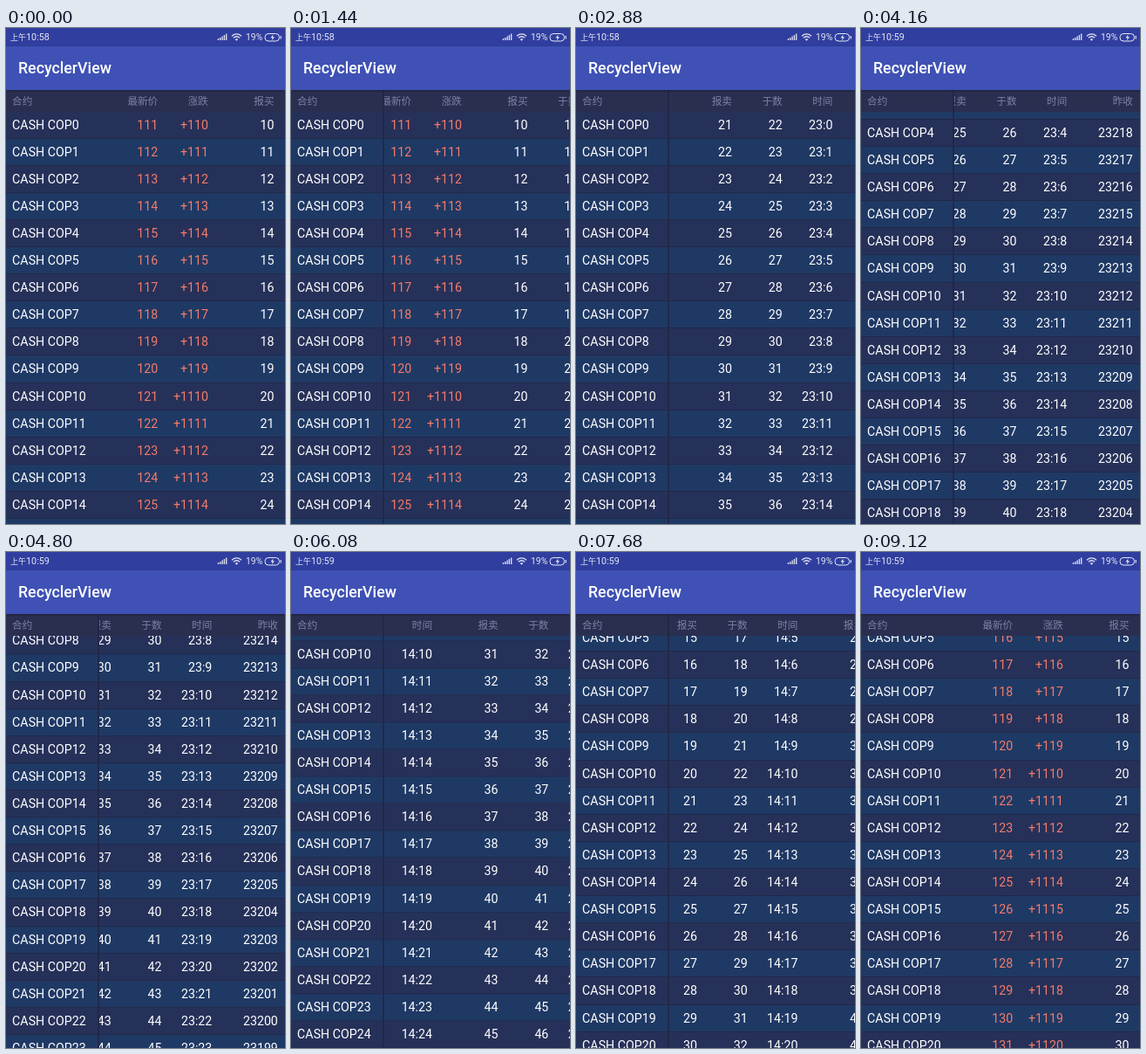
Write an HTML page that moves like this. It is 320x568 px and loops after 9280 ms.

```html
<!DOCTYPE html>
<html lang="zh-CN">
<head>
<meta charset="utf-8">
<title>RecyclerView</title>
<style>
  :root { --dp: .88889px; --x: 0px; --y: 0px; --fixed: calc(120 * var(--dp)); --line: #222848; }
  html, body { margin: 0; width: 100%; height: 100%; overflow: hidden; background: #263159; }
  body { font-family: Roboto, "Noto Sans CJK SC", "Noto Sans CJK", sans-serif; color: #fff; }
  #stage { position: relative; width: 320px; height: 568px; overflow: hidden; background: #263159; }
  #status { position: absolute; inset: 0 0 auto; height: 21px; background: #303f9f; color: #e4e6f3; }
  #status span { position: absolute; top: 0; line-height: 22px; white-space: nowrap; }
  #time { left: 5px; font-size: 10.8px; }
  #time small { font-size: 9px; }
  #time b { font-weight: 400; }
  #level { left: 275px; font-size: 10.4px; }
  #status svg { position: absolute; left: 240px; top: 0; }
  #toolbar { position: absolute; top: 21px; width: 320px; height: 50px; box-sizing: border-box;
    padding-left: 14px; font: 500 17.78px/51px Roboto, sans-serif; background: #3f51b5;
    box-shadow: 0 1px 3px #0005; z-index: 2; }
  .row { position: relative; height: calc(35 * var(--dp)); line-height: calc(35 * var(--dp));
    font-size: calc(16 * var(--dp)); white-space: nowrap; background: #263159; }
  .row:nth-child(even) { background: #1f3965; }
  .row::after { content: ""; position: absolute; inset: auto 0 0; height: 1px; background: var(--line); }
  .name { position: absolute; left: calc(8 * var(--dp)); }
  .pane { position: absolute; left: var(--fixed); right: 0; height: 100%; clip-path: inset(0 0 0 -1px); }
  .track { display: flex; width: max-content; transform: translateX(calc(-1 * var(--x))); }
  .cell { box-sizing: border-box; padding-right: calc(9 * var(--dp)); text-align: right; flex: none; }
  .up { color: #f57b69; }
  #head { position: absolute; top: 71px; width: 320px; height: 24.5px; line-height: 26px;
    font-size: 11.6px; font-weight: 300; background: #2a2f50; color: #7b82a4; }
  #head .up { color: inherit; }
  #list { position: absolute; top: 95.5px; width: 320px; bottom: 0; overflow: hidden; }
  #rows { transform: translateY(calc(-1 * var(--y))); }
  #edge { position: absolute; left: 105px; top: 71px; bottom: 0; width: 1.5px; background: var(--line); }
</style>
</head>
<body>
<div id="stage">
  <div id="status">
    <span id="time"><small>上午</small><b>10:58</b></span>
    <svg width="80" height="21" fill="none" stroke="#e4e6f3">
      <path d="M3.5 14v-2M5.8 14v-3M8.1 14v-4.5M10.4 14v-6M12.7 14v-7.5" stroke-width="1.3"/>
      <path d="M19 9.2q5.5-4.6 11 0M20.9 11.2q3.6-2.9 7.2 0" stroke-width="1.3"/>
      <path d="M22.6 12.8q1.9-1.3 3.8 0l-1.9 2z" fill="#e4e6f3" stroke="none"/>
      <rect x="57" y="6.5" width="16.500" height="8.500" rx="4"/>
      <path d="M75.200 9v3.500" stroke-width="1.2"/>
      <path d="M66.500 7.500l-3 3.800h2l-.5 2.900 3-3.900h-2z" fill="#e4e6f3" stroke="none"/>
    </svg>
    <span id="level">19%</span>
  </div>
  <div id="toolbar">RecyclerView</div>
  <div id="head"></div>
  <div id="list"><div id="rows"></div></div>
  <div id="edge"></div>
</div>
<script>
const LOOP = 9280, STEP = 160, ROWS = 30, CLOCK_TICK = 3840;

// title, width in dp, value of row i, class
const columns = [
  ['最新价', 85, i => 111 + i, 'up'],
  ['涨跌', 65, i => '+11' + i, 'up'],
  ['报买', 85, i => 10 + i],
  ['于数', 65, i => 12 + i],
  ['时间', 65, i => '14:' + i],
  ['报卖', 85, i => 21 + i],
  ['于数', 65, i => 22 + i],
  ['时间', 65, i => '23:' + i],
  ['昨收', 85, i => 23222 - i],
];

// [time, scroll offset]
const scrollX = [[0, 0], [480, 0], [1120, 32], [1440, 36], [1760, 100], [2240, 245], [2720, 319.7],
  [3040, 319.7], [3360, 377.8], [5440, 377.8], [6080, 261], [6560, 168.6], [7680, 168.6],
  [7840, 14], [8000, 0], [LOOP, 0]];
const scrollY = [[0, 0], [3520, 0], [4000, 75], [4480, 195], [4800, 257.8], [5280, 304.6],
  [6720, 304.6], [7040, 260], [7520, 168], [LOOP, 168]];

const $ = id => document.getElementById(id);

const line = (name, text) => `<div class="name">${name}</div><div class="pane"><div class="track">` +
  columns.map(c => `<div class="cell ${c[3] || ''}" style="width:calc(${c[1]} * var(--dp))">${text(c)}</div>`).join('') +
  '</div></div>';

$('head').innerHTML = line('合约', c => c[0]);
$('rows').innerHTML = Array.from({ length: ROWS },
  (_, i) => `<div class="row">${line('CASH COP' + i, c => c[2](i))}</div>`).join('');

function at(track, t) {
  const k = track.findIndex(p => p[0] > t);
  const [t0, v0] = track[k - 1], [t1, v1] = track[k];
  return v0 + (v1 - v0) * (t - t0) / (t1 - t0);
}

const clock = document.querySelector('#time b');
const root = document.documentElement.style;
let shown = -1;

function draw(now) {
  const t = Math.floor(now % LOOP / STEP) * STEP;
  if (t === shown) return;
  shown = t;
  const x = at(scrollX, t);
  root.setProperty('--x', x + 'px');
  root.setProperty('--y', at(scrollY, t) + 'px');
  $('edge').style.visibility = x > 0 ? 'visible' : 'hidden';
  clock.textContent = t < CLOCK_TICK ? '10:58' : '10:59';
}

const start = performance.now();
function tick() {
  draw(performance.now() - start);
  requestAnimationFrame(tick);
}
tick();
</script>
</body>
</html>
```
